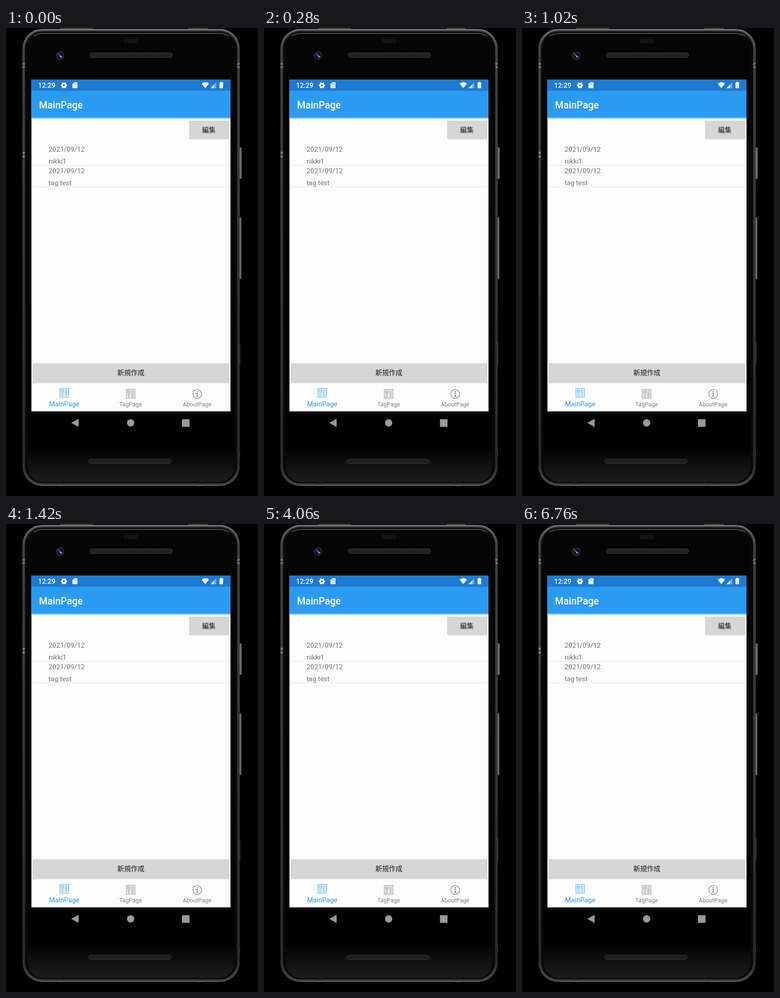
An HTML page that plays this animation: 550x1018 px, repeating every 8000 ms.

```html
<!DOCTYPE html>
<html lang="ja">
<head>
<meta charset="utf-8">
<title>Diary app</title>
<style>
  html, body { margin: 0; width: 100%; height: 100%; overflow: hidden; background: #000; }
  svg { display: block; width: 550px; height: 1018px; }
  text { font-family: Roboto, "Noto Sans CJK JP", "Noto Sans CJK", sans-serif; font-size: 14.8px; }
  .mid { text-anchor: middle; }
  .bold { font-weight: 500; }
  .row { fill: #757575; }
  .tab { fill: #808080; font-size: 12.7px; }
  .tab.on { fill: #2a9af2; font-size: 14.8px; }
  .key { fill: #d6d6d6; stroke: #c6c6c6; stroke-width: .6; }
  .label { fill: #1c1c1c; }
</style>
</head>
<body>
<svg viewBox="0 0 550 1018">
  <defs>
    <linearGradient id="rim" x2="0" y2="1">
      <stop offset="0" stop-color="#777"/>
      <stop offset=".05" stop-color="#565656"/>
      <stop offset=".5" stop-color="#474747"/>
      <stop offset=".95" stop-color="#303030"/>
      <stop offset="1" stop-color="#5c5c5c"/>
    </linearGradient>
    <linearGradient id="glass" x2="0" y2="1">
      <stop offset="0" stop-color="#050505"/>
      <stop offset=".92" stop-color="#000"/>
      <stop offset=".96" stop-color="#101010"/>
      <stop offset="1" stop-color="#1c1c1c"/>
    </linearGradient>
    <linearGradient id="side">
      <stop offset="0" stop-color="#444"/>
      <stop offset=".6" stop-color="#777"/>
      <stop offset="1" stop-color="#333"/>
    </linearGradient>
    <linearGradient id="shade" x2="0" y2="1">
      <stop offset="0" stop-color="#b4bccb"/>
      <stop offset="1" stop-color="#fcfcfc"/>
    </linearGradient>
    <g id="news" fill="none" stroke="currentColor">
      <rect x=".6" y=".6" width="18.8" height="18.8" stroke-width="1.1"/>
      <rect x="3.6" y="4" width="5" height="4.5" stroke-width="1.3"/>
      <path d="M11 4h6M11 6.5h6M11 9h6M3 11.5h6M11 11.5h6M3 14h6M11 14h6M3 16.5h6M11 16.5h6"/>
    </g>
  </defs>

  <rect width="550" height="1018"/>

  <!-- Phone body -->
  <g fill="url(#side)">
    <rect x="508" y="260" width="7" height="68" rx="2"/>
    <rect x="508" y="412" width="6" height="134" rx="2"/>
    <rect x="508" y="685" width="3.5" height="47" fill="#333"/>
    <rect x="508" y="922" width="3" height="11" fill="#333"/>
  </g>
  <path d="M118 1.5h72M398 1.5h42M112 995.5h16M412 995.5h20" stroke="#55554c" stroke-width="2"/>
  <rect x="36" y="2" width="474" height="994" rx="43" fill="url(#rim)"/>
  <rect x="37.5" y="4" width="471" height="990" rx="42" fill="#202020"/>
  <rect x="39.5" y="5" width="467" height="987.5" rx="40" fill="none" stroke="url(#rim)" stroke-width="1.6"/>
  <rect x="42" y="9" width="462" height="981" rx="38" fill="#080808"/>
  <rect x="47" y="12" width="452" height="976" rx="35" fill="url(#glass)"/>
  <path d="M60 18Q69 12 82 12H464Q478 12 487 18" fill="none" stroke="#6a6a6a" stroke-width="1.4"/>
  <path d="M36 76h5v11h-5zM505 76h5v11h-5zM36 269h5v13h-5z" fill="#777"/>
  <path d="M36 81.500h5M505 81.500h5M36 275.500h5" stroke="#222" stroke-width="2"/>

  <rect x="257" y="22" width="32" height="12" rx="5" fill="#121214"/>
  <rect x="183.500" y="53.500" width="180" height="11" rx="5" fill="#232323" stroke="#343434"/>
  <circle cx="118" cy="60" r="9.500" fill="#26262a"/>
  <circle cx="118" cy="60" r="6.500" fill="#0d0d16"/>
  <path d="M115 57l6 6" stroke="#3546a0" stroke-width="4" stroke-linecap="round"/>
  <circle cx="120" cy="62.300" r="1.500" fill="#aab6ee"/>
  <rect x="180.500" y="937.500" width="180" height="10" rx="5" fill="#202020" stroke="#323232"/>

  <!-- App -->
  <rect x="55.500" y="112" width="434.500" height="722" fill="#fcfcfc"/>
  <rect x="55.500" y="112" width="434.500" height="25" fill="#1e7ad2"/>
  <rect x="55.500" y="136.500" width="434.500" height="59" fill="#2b9bf2"/>
  <rect x="55.500" y="195.500" width="434.500" height="4" fill="url(#shade)"/>

  <g fill="#fff">
    <text class="bold" x="70" y="130">12:29</text>
    <circle cx="126.500" cy="124.700" r="3.700" fill="none" stroke="#fff" stroke-width="3.400"/>
    <g id="teeth"></g>
    <path d="M149 118h5.500q1.500 0 1.500 1.500v10q0 1.500-1.500 1.500h-8q-1.500 0-1.500-1.500v-7.500z"/>
    <path d="M148.500 120v2.500M150.800 120v2.500M153.100 120v2.500" stroke="#1e7ad2"/>
    <path d="M427 121q8-6.500 16 0l-8 9.800z"/>
    <path d="M459 118v13h-13z" opacity=".35"/>
    <path d="M454.500 122.500v8.500h-8.500z" opacity=".75"/>
    <path d="M468 118.500v-1.500h4v1.500h1q1 0 1 1v10.500q0 1-1 1h-6q-1 0-1-1v-10.500q0-1 1-1z"/>
    <text class="bold" x="72" y="175" style="font-size:21.200px">MainPage</text>
  </g>

  <rect x="400" y="203" width="87" height="39.500" rx="2" fill="#e4e4e4"/>
  <rect class="key" x="400.300" y="202" width="86" height="39" rx="2"/>
  <text class="label mid bold" x="442.500" y="227">編集</text>

  <g class="row">
    <text x="93" y="269">2021/09/12</text>
    <text x="93" y="295">nikki1</text>
    <text x="93" y="315.500">2021/09/12</text>
    <text x="93" y="342">tag test</text>
  </g>
  <path d="M55.500 298.500H490" stroke="#e6e6ec"/>
  <path d="M55.500 345.500H490" stroke="#e6e6d8"/>

  <rect x="58" y="731" width="429" height="41.500" rx="2" fill="#e4e4e4"/>
  <rect class="key" x="58.500" y="730" width="428" height="41" rx="2"/>
  <text class="label mid bold" x="272.500" y="755">新規作成</text>

  <use href="#news" x="117" y="783.500" color="#4ba9f3"/>
  <use href="#news" x="262" y="785.500" color="#8a8a8a"/>
  <circle cx="417.300" cy="796" r="9.600" fill="none" stroke="#858585" stroke-width="1.300"/>
  <path d="M415.300 794.500h2.300v6.500M415 801h5" fill="none" stroke="#777" stroke-width="1.500"/>
  <circle cx="417.300" cy="791.300" r="1.300" fill="#777"/>
  <text class="tab on mid" x="127" y="823">MainPage</text>
  <text class="tab mid" x="272" y="823">TagPage</text>
  <text class="tab mid" x="417" y="823">AboutPage</text>

  <!-- Navigation keys -->
  <g fill="#999">
    <path d="M142.500 859l16-9v18z"/>
    <circle cx="272" cy="859" r="8"/>
    <rect x="384" y="851" width="16.500" height="16.500" rx="1"/>
  </g>
</svg>
<script>
  // The screen rests in one state for the whole loop, so it is drawn once.
  document.getElementById('teeth').innerHTML = Array.from({ length: 6 }, (_, i) =>
    `<rect x="124.7" y="118" width="3.6" height="3" rx=".6" transform="rotate(${i * 60 + 30} 126.5 124.7)"/>`
  ).join('');
</script>
</body>
</html>
```
